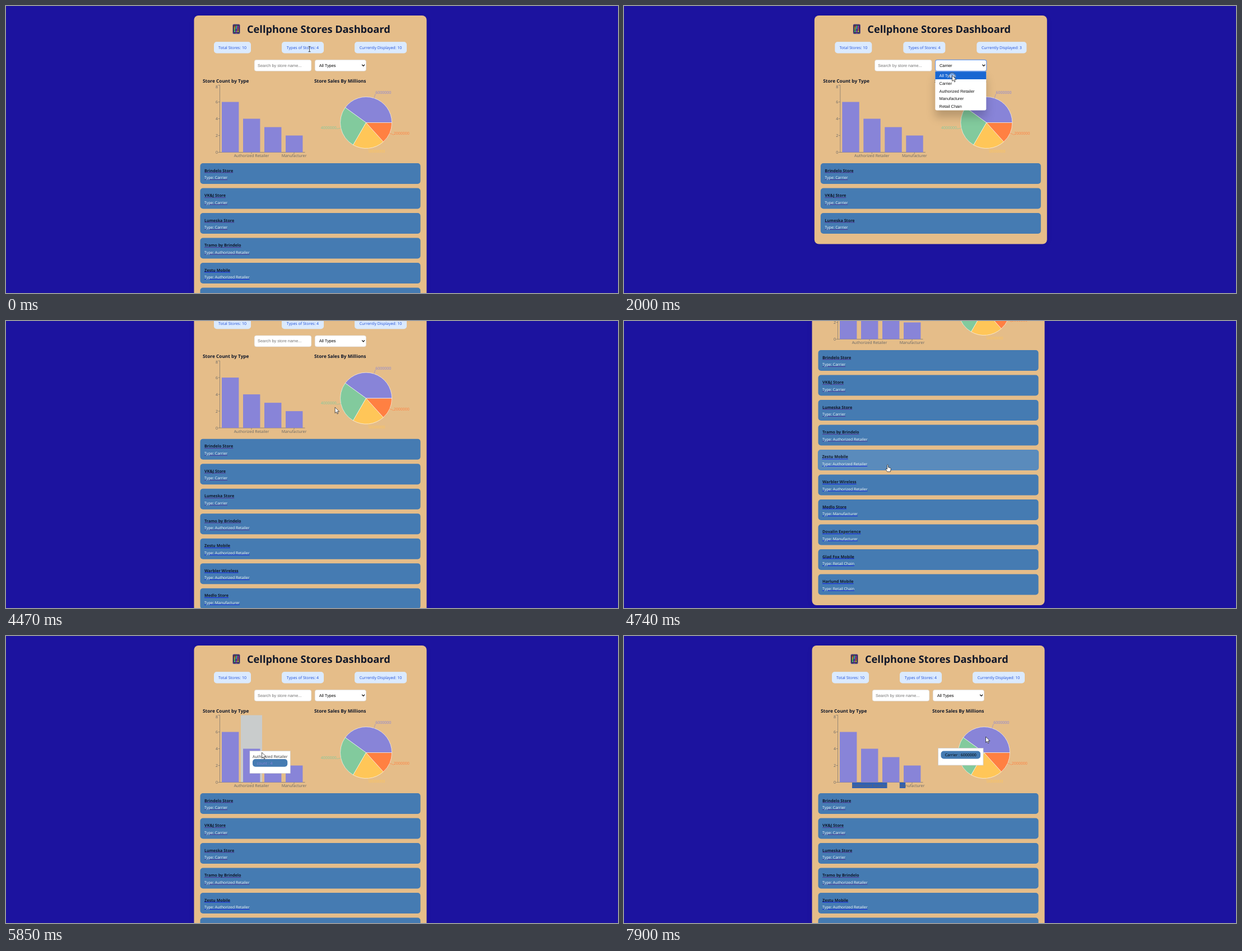
Animation, 1092 px wide and 513 px high, one loop 8000 ms. Source, as an HTML page:

```html
<!DOCTYPE html>
<html lang="en">
<head>
<meta charset="utf-8">
<title>Cellphone Stores Dashboard</title>
<style>
  html, body { margin: 0; width: 100%; height: 100%; overflow: hidden; background: #1c139f; }
  svg { display: block; width: 100%; height: 100%; }
  text { font-family: "Open Sans", "Noto Sans", sans-serif; font-size: 7px; text-rendering: geometricPrecision; white-space: pre; }
  .title { font-size: 18.2px; font-weight: 700; fill: #0f172a; }
  .head { font-size: 8.3px; font-weight: 700; fill: #0f172a; }
  .stat { font-weight: 500; fill: #1d4ed8; }
  .name { font-size: 7.2px; font-weight: 700; text-decoration: underline; }
  .type { font-size: 6.9px; text-decoration: underline; }
  .ui { font-family: "Liberation Sans", Arial, sans-serif; font-size: 7.4px; }
  .axis { fill: #666; }
  .sheet { filter: drop-shadow(0 2px 5px rgba(0, 0, 0, .06)); }
  .menu { filter: drop-shadow(0 12px 8px rgba(0, 0, 0, .2)); }
</style>
</head>
<body>
<svg id="stage" viewBox="0 0 1092 513" preserveAspectRatio="none"></svg>
<script>
const LOOP = 8000, BEAT = 130;
const STEEL = '#457bb2', MARK = '#2f60b4';
const TYPES = ['All Types', 'Carrier', 'Authorized Retailer', 'Manufacturer', 'Retail Chain'];
const STORES = [
  ['Brindelo Store', 1], ['VK&amp;J Store', 1], ['Lumeska Store', 1],
  ['Tramo by Brindelo', 2], ['Zestu Mobile', 2], ['Warbler Wireless', 2],
  ['Medlo Store', 3], ['Dovalin Experience', 3],
  ['Glad Fox Mobile', 4], ['Harlund Mobile', 4]
];
const DATA = [
  ['Carrier', 6, '#8884d8'], ['Authorized Retailer', 4, '#82ca9d'],
  ['Retail Chain', 3, '#ffc658'], ['Manufacturer', 2, '#ff8042']
];

// Storyboard: each step changes the state; `at` is pointer x, y and page scroll
const STORY = [
  [0, { at: [541.5, 77, 0], cursor: 'beam', slice: -1, picked: 0, few: 0 }],
  [270, { at: [568, 98, 0], cursor: 'arrow' }],
  [400, { at: [579, 107, 0], open: true, focus: true }],
  [650, { at: [580, 140, 0] }],
  [1050, { at: [580, 140, 0], open: false, few: 1 }],
  [1330, { at: [580, 119.5, 0] }],
  [1600, { at: [582, 103, 0], open: true }],
  [1750, { at: [585.5, 124, 0] }],
  [2000, { at: [585.5, 124, 0], click: true }],
  [2150, { at: [591, 123, 0], click: false, open: false, few: 0 }],
  [2580, { at: [650, 82, 0] }],
  [2870, { at: [618, 113, 0] }],
  [3240, { at: [664, 86, 0] }],
  [3540, { at: [654.5, 76, 0], cursor: 'beam', click: true }],
  [3690, { at: [654.5, 76, 0], cursor: 'arrow', click: false, focus: false }],
  [4180, { at: [702, 72, 0] }],
  [4320, { at: [653, 95, 0] }],
  [4590, { at: [475, 255, 190], cursor: 'hand' }],
  [4690, { warm: 4 }],
  [4740, { at: [470.5, 257, 229] }],
  [4860, { at: [455, 258, 229] }],
  [4980, { at: [422, 259, 196], cursor: 'arrow' }],
  [5100, { warm: -1 }],
  [5460, { at: [425, 250, 0] }],
  [5610, { at: [440, 225, 0], bars: true }],
  [5730, { at: [478, 200, 0] }],
  [5850, { at: [456.5, 208, 0] }],
  [6210, { at: [440, 235, 0] }],
  [6480, { at: [409, 267, 0], bars: false, cursor: 'beam' }],
  [6600, { picked: 1 }],
  [6780, { at: [690, 240, 0], picked: 4 }],
  [7080, { at: [483, 268, 0], picked: 1 }],
  [7200, { at: [516, 268, 0], picked: 2, cursor: 'arrow' }],
  [7360, { at: [604, 239, 0] }],
  [7510, { at: [618, 224, 0], slice: 1 }],
  [7780, { at: [642, 195, 0], slice: 0 }],
  [7900, { at: [645.5, 180, 0] }]
];
const MOVES = STORY.filter(([, s]) => s.at);

function stateAt(t) {
  const s = Object.assign({}, ...STORY.filter(([at]) => at <= t).map(([, change]) => change));
  const i = MOVES.findIndex(([at]) => at > t);
  if (i > 0) {
    const [[t0, a], [t1, b]] = [MOVES[i - 1], MOVES[i]];
    s.at = a.at.map((v, j) => v + (b.at[j] - v) * (t - t0) / (t1 - t0));
  }
  const [x, y] = s.at;
  s.col = s.bars ? Math.floor((x - 381) / 38) : -1;
  s.item = !s.open ? -1 : y < 117 ? s.few : Math.floor((y - 117.2) / 13.8);
  s.heat = Math.min(1, (t - 4690) / 290);
  return s;
}

const mix = (a, b, p) => `rgb(${a.map((v, i) => Math.round(v + (b[i] - v) * p))})`;
const rect = (x, y, w, h, fill, r = 0, more = '') =>
  `<rect x="${x}" y="${y}" width="${w}" height="${h}" rx="${r}" fill="${fill}" ${more}/>`;
const text = (x, y, str, cls = '', more = '') => `<text x="${x}" y="${y}" class="${cls}" ${more}>${str}</text>`;
const mid = (x, y, str, cls) => text(x, y, str, cls, 'text-anchor="middle"');
const path = (d, stroke, w, fill = 'none', more = '') =>
  `<path d="${d}" stroke="${stroke}" stroke-width="${w}" fill="${fill}" ${more}/>`;
const group = (x, y, body, scale = 1) => `<g transform="translate(${x} ${y}) scale(${scale})">${body}</g>`;

function phone() {
  let s = rect(404.5, 32.5, 13, 17.5, '#51457f', 2) + rect(405.8, 34.2, 10.4, 13.4, '#1d1a30', .6);
  for (let i = 0; i < 12; i++)
    s += rect(406.8 + i % 3 * 3, 35.2 + (i / 3 | 0) * 3, 2.3, 2.3, `hsl(${i * 137 % 360} 80% 62%)`, .4);
  return s + rect(409.5, 48.2, 3, .8, '#8d83b5', .4);
}

function stats(few) {
  const list = [['Total Stores: 10', 371, 66], ['Types of Stores: 4', 492, 75],
    ['Currently Displayed: ' + (few ? 3 : 10), 622, few ? 89 : 93]];
  return list.map(([label, x, w], i) => {
    const left = x + few * (i + 1);
    return rect(left, 64, w, 20.5, '#dbeafe', 5) + mid(left + w / 2, 77, label, 'stat');
  }).join('');
}

function controls({ few, open, focus }) {
  const line = 'stroke="#d3d3d3" stroke-width=".6"';
  const ring = `stroke="${open ? '#6b9cf0' : '#0b0b0b'}" stroke-width="1.2"`;
  return rect(443.2, 96.3, 101.6, 20, '#fff', 3.5, line) +
    text(449, 108.6, 'Search by store name...', 'ui', 'fill="#757575"') +
    rect(551.2, 96.3, 91.3, 20, '#fff', 3.5, focus ? ring : line) +
    text(558.7, 108.6, TYPES[few], 'ui') +
    path('M635.2 104.8L637.6 107.4 640 104.8', '#111', 1.3);
}

function barChart({ col, picked }) {
  let s = text(351, 136.5, 'Store Count by Type', 'head');
  if (col >= 0) s += rect(381 + col * 38, 141.5, 38, 120, '#c9cccc');
  let axis = 'M381.5 141.5V261.5H533.5M438 261.5v3M514 261.5v3';
  for (let v = 0; v <= 8; v += 2) {
    const y = 261.5 - v * 15;
    axis += `M378.5 ${y}h3`;
    s += text(378, Math.max(y + 2.6, 146.6), v, 'axis', 'text-anchor="end"');
  }
  s += path(axis, '#666', .6);
  DATA.forEach(([, v], i) => s += rect(385 + i * 38, 261.5 - v * 15, 30.4, v * 15, '#8884d8'));
  if (picked) s += rect(407, 262, 62.5, 10, MARK);
  if (picked > 1) s += rect(491.8, 262, picked > 2 ? 44 : 10.4, 10, MARK);
  return s + mid(438, 270, 'Authorized Retailer', 'axis') + mid(514, 270, 'Manufacturer', 'axis');
}

function barTip(col) {
  if (col < 0) return '';
  const [label, n] = DATA[col], w = 20 + label.length * 2.75, x = 397 + col * 38;
  return rect(x, 205.5, w, 40, '#fff', 0, 'stroke="#ccc" stroke-width=".6"') +
    text(x + 5, 218, label, '', 'fill="#333"') +
    rect(x + 5, 220, w - 10, 13.8, STEEL, 5) +
    text(x + 12.5, 229.5, 'count : ' + n, '', 'fill="#8884d8"');
}

function pieChart(picked) {
  const cx = 642.5, cy = 208.5;
  const at = (deg, r) => {
    const a = deg * Math.PI / 180;
    return [cx + r * Math.cos(a), cy - r * Math.sin(a)];
  };
  let s = text(550, 136.5, 'Store Sales By Millions', 'head'), from = 0;
  for (const [, v, hue] of DATA) {
    const to = from + v * 24, half = (from + to) / 2, [x, y] = at(half, 54), left = x < cx;
    s += path(`M${cx} ${cy}L${at(from, 46)}A46 46 0 0 0 ${at(to, 46)}Z`, '#fff', .6, hue) +
      path(`M${at(half, 46)}L${x} ${y}`, hue, .6);
    if (picked > 3) s += rect(x - (left ? 28 : 0), y - 7.5, 28, 10, MARK);
    s += text(x, y, v + '000000', '', `fill="${hue}" text-anchor="${left ? 'end' : 'start'}"`);
    from = to;
  }
  return s;
}

function pieTip(i) {
  if (i < 0) return '';
  const label = `${DATA[i][0]} : ${DATA[i][1]}000000`;
  const w = 27.4 + label.length * 3.125, x = 560.5 - i * 6.5, y = 200.5 + i * 16.5;
  return rect(x, y, w, 30.5, '#fff', 0, 'stroke="#ccc" stroke-width=".8"') +
    rect(x + 5, y + 5, w - 10, 14, STEEL, 5) + mid(x + w / 2, y + 14.5, label);
}

function card([name, type], i, heat) {
  const link = `fill="${i < 4 ? '#551a8b' : '#0000ee'}"`;
  const pale = mix([244, 247, 252], [212, 226, 241], heat);
  const body = rect(-196.5, -18.5, 393, 37, mix([69, 123, 178], [191, 213, 234], heat), 5) +
    text(-189, -3, `<tspan fill="#0f172a">${name}</tspan>`, 'name', link) +
    text(-189, 9.6, `<tspan fill="${pale}">Type: ${TYPES[type]}</tspan>`, 'type', link);
  return group(543, 299.5 + i * 44.5, body, 1 + .0175 * heat);
}

function menu(active) {
  if (active < 0) return '';
  return rect(551, 117, 91, 69.5, '#fff', 3, 'class="menu"') + TYPES.map((label, i) => {
    const y = 117.2 + i * 13.8, on = i === active;
    return (on ? rect(551, y, 91, 13.8, '#1967d2') : '') +
      text(558.3, y + 9.7, label, 'ui', `fill="${on ? '#fff' : '#111'}"`);
  }).join('');
}

const CURSORS = {
  arrow: path('M0 0V10.4L2.4 8.2 4 11.8 5.6 11.1 4.1 7.6H7.4Z', '#111', .7, '#fff'),
  hand: path('M-1 .6Q0-.7 1 .6V4.6L4.6 5.6Q6 6 5.7 8L4.8 12.4H-.6L-3.8 8Q-3.6 6.3-1 8Z', '#111', .7, '#fff', 'stroke-linejoin="round"'),
  beam: path('M-2-4.6H2M0-4.6V4.6M-2 4.6H2', '#222', .8)
};
const RING = '<circle cy=".5" r="5.3" fill="#fff" fill-opacity=".35" stroke="#555" stroke-width=".8"/>';

function draw(t) {
  const s = stateAt(t), [x, y, scroll] = s.at;
  const shown = s.few ? STORES.slice(0, 3) : STORES;
  const page =
    rect(335.5, 17, 415, 275 + 44.5 * shown.length, '#e5bd89', 8, 'class="sheet"') +
    phone() + text(430, 47.8, 'Cellphone Stores Dashboard', 'title') +
    stats(s.few) + controls(s) + barChart(s) + pieChart(s.picked) +
    shown.map((store, i) => card(store, i, i === s.warm ? s.heat : 0)).join('') +
    barTip(s.col) + pieTip(s.slice) + menu(s.item);
  return rect(0, 0, 1092, 513, '#1c139f') +
    group(s.few * 4.3, -scroll, page) + group(x, y, (s.click ? RING : '') + CURSORS[s.cursor]);
}

// The screen refreshes on a steady beat and at every storyboard step
const stage = document.getElementById('stage');
const start = performance.now();
let last = -1;
function frame() {
  const now = (performance.now() - start) % LOOP;
  const step = STORY.filter(([at]) => at <= now).pop()[0];
  const tick = Math.max(step, Math.floor(now / BEAT) * BEAT);
  if (tick !== last) stage.innerHTML = draw(last = tick);
  requestAnimationFrame(frame);
}
frame();
</script>
</body>
</html>
```
